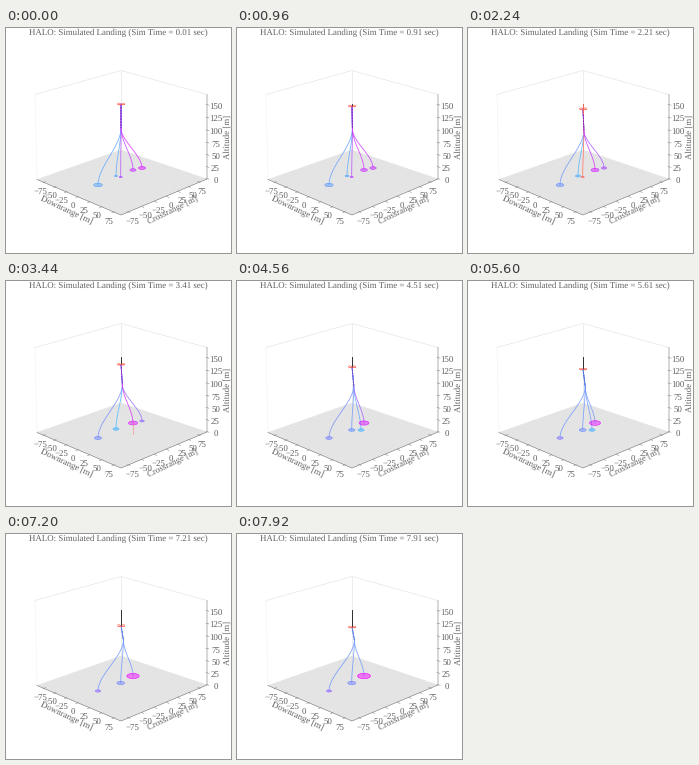
A matplotlib script that plays this animation: 225 px wide and 225 px high, repeating every 8000 ms.

```python
import numpy as np
import matplotlib.pyplot as plt
from matplotlib.animation import FuncAnimation
from matplotlib.collections import LineCollection
from matplotlib.colors import to_rgba
from matplotlib.patches import Ellipse, Polygon

plt.rcParams["font.family"] = "Liberation Serif"
plt.rcParams["text.hinting"] = "none"

SIZE, DPI = 225, 72          # one point equals one pixel
FRAMES, INTERVAL = 100, 80
DURATION = FRAMES * INTERVAL / 1000
FONT, INK, AXIS, PANE, RED = 8.9, "#626262", "#808080", "#e6e6e6", "#ff6a5a"
COOL = plt.get_cmap("cool")

fig = plt.figure(figsize=(SIZE / DPI, SIZE / DPI), dpi=DPI, facecolor="white")
ax = fig.add_axes([0, 0, 1, 1])
ax.set(xlim=(0, SIZE), ylim=(SIZE, 0))
ax.axis("off")

LEFT, BACK, RIGHT, FRONT = map(np.array, ((31, 151.5), (115, 122), (201, 151), (115, 187)))


def label(x, y, text, angle=0):
    # Move along the text's own "down" so the glyphs, not the line box, are centred.
    turn = np.radians(angle)
    ax.text(x + 1.3 * np.sin(turn), y + 1.3 * np.cos(turn), text, size=FONT, color=INK,
            ha="center", va="center", rotation=angle, rotation_mode="anchor")


def line(points, color, width, **kw):
    return ax.plot(*zip(*points), color=color, lw=width, **kw)[0]


def ground():
    ax.add_patch(Polygon([LEFT, BACK, RIGHT, FRONT], fc="#ebebeb", ec="none", zorder=0))
    s = np.linspace(0, 1, 41)[:, None]
    rows = np.stack([LEFT + s * (FRONT - LEFT), BACK + s * (RIGHT - BACK)], axis=1)
    cols = np.stack([LEFT + s * (BACK - LEFT), FRONT + s * (RIGHT - FRONT)], axis=1)
    ax.add_collection(LineCollection([*rows, *cols], colors="#dcdcdc", linewidths=0.35, zorder=0))


def box():
    top_left, top_back, top_right = (29, 66.5), (115, 42.5), (201, 66.5)
    line([top_left, top_back, top_right], PANE, 0.7)
    line([top_back, BACK], PANE, 0.7)
    line([top_left, LEFT], "#f2f2f2", 0.6)
    line([LEFT, FRONT, RIGHT, top_right], AXIS, 0.6)

    for i in range(7):
        text = str(25 * i - 75).replace("-", "\u2212")
        # Steps widen towards the viewer.
        x, y = 34 + 10.4 * i + 0.18 * i * i, 162 + 5 * i
        label(x, y, text)
        line([(x + 5.5, y - 8.5), (x + 3, y - 7.3)], AXIS, 0.5)
        x, y = 126 + 14.3 * i - 0.43 * i * i, 192.3 - 5 * i
        label(x, y, text)
        line([(x - 4.5, y - 9), (x - 2, y - 7.8)], AXIS, 0.5)
        y = 152 - 11.8 * i - 0.09 * i * i
        label(209.5, y, str(25 * i))
        line([(200, y - 1.5), (203, y - 0.8)], AXIS, 0.5)
    label(61, 180.8, "Downrange [m]", -25)
    label(166, 181.3, "Crossrange [m]", 26)
    label(220.3, 109, "Altitude [m]", 90)


class Route:
    """A planned descent to one site, shown for a while, with drifting cost and spread."""

    def __init__(self, site, cost, spread, start=0, end=DURATION, color=None):
        self.site, self.cost, self.spread = np.array(site), cost, spread
        self.start, self.end, self.color = start, end, color
        self.path = line([site, site], "b", 0.8, alpha=0.85, zorder=3)
        self.spot = ax.add_patch(Ellipse(site, 1, 1, lw=0.6, zorder=3))

    def update(self, t, craft, fork):
        visible = self.start <= t < self.end
        self.path.set_visible(visible)
        self.spot.set_visible(visible)

        progress = t / DURATION
        cost, spread = (a + (b - a) * progress for a, b in (self.cost, self.spread))
        settle = np.clip((t - 3.5) / 2, 0, 1)
        spot_color = self.color or COOL(cost)
        path_color = self.color or COOL(cost + (0.42 - cost) * settle)

        # Shared trunk, then an S-curve that leaves and lands vertically.
        s = np.linspace(0, 1, 30)[:, None]
        lean = np.array([0, 0.32 * (self.site[1] - fork[1])])
        curve = ((1 - s) ** 3 * fork + 3 * s * (1 - s) ** 2 * (fork + lean)
                 + 3 * s ** 2 * (1 - s) * (self.site - lean) + s ** 3 * self.site)
        self.path.set_data(*np.vstack([craft, curve]).T)
        self.path.set_color(path_color)
        self.spot.set(width=spread, height=0.42 * spread,
                      edgecolor=spot_color, facecolor=to_rgba(spot_color, 0.5))


ground()
box()
title = ax.text(SIZE / 2, 6.6, "", size=FONT, color=INK, ha="center", va="baseline")

routes = [
    Route((92, 157), (0.35, 0.6), (8.5, 5)),
    Route((110, 148), (0.35, 0.2), (3, 10), end=4.5),
    Route((136, 140), (0.85, 0.2), (7, 1), end=4.5),
    Route((114.7, 149), (0.7, 0.9), (3, 3), end=2),
    Route((114.7, 149), (0, 0), (3, 3), start=2, end=2.5, color=RED),
    Route((114.7, 149), (0.35, 0.48), (4, 8), start=4),
    Route((124, 149), (0.3, 0.3), (6, 6), start=4.5, end=6.5),
    Route((127, 142), (0.78, 0.95), (6, 13)),
]

plan = line([(115, 80), (115, 96)], "#25256a", 0.9, ls=(0, (1.8, 1.4)), zorder=4)
trail = line([(115, 75.5), (115, 76)], "#202020", 0.9, zorder=4)
drift = line([(127, 142), (127, 153)], RED, 0.7, alpha=0.6, zorder=4)
mast = line([(115, 70), (115, 85)], RED, 0.9, zorder=5)
arm = line([(112, 76), (118, 76)], RED, 0.7, zorder=5)
rotors = [ax.add_patch(Ellipse((x, 76), 3, 1.8, fc=to_rgba(RED, 0.3), ec=RED, lw=0.5, zorder=5))
          for x in (112.8, 117.4)]


def update(frame):
    t = frame * 4 // 5 / 10 + 0.01       # the simulation advances in tenths
    craft = np.array([115, 76 + 2.15 * t])
    fork = np.array([115 + 0.4 * min(t, 6), 100 + min(t, 6)])
    title.set_text(f"HALO: Simulated Landing (Sim Time = {t:.2f} sec)")
    for route in routes:
        route.update(t, craft, fork)

    plan.set_data(*zip(craft, fork))
    plan.set_alpha(0.85 - 0.06 * t)
    trail.set_data([115, 115], [75.5, craft[1]])
    mast.set_data([115, 115], [craft[1] - 5, craft[1] + 4])
    mast.set_visible(2 <= t < 2.5)
    drift.set_visible(3.2 <= t < 3.6)
    arm.set_ydata([craft[1]] * 2)
    for rotor in rotors:
        rotor.set_center((rotor.get_center()[0], craft[1]))


anim = FuncAnimation(fig, update, frames=FRAMES, interval=INTERVAL,
                     init_func=lambda: update(0), repeat=True, repeat_delay=0, blit=False)
plt.show()
```
